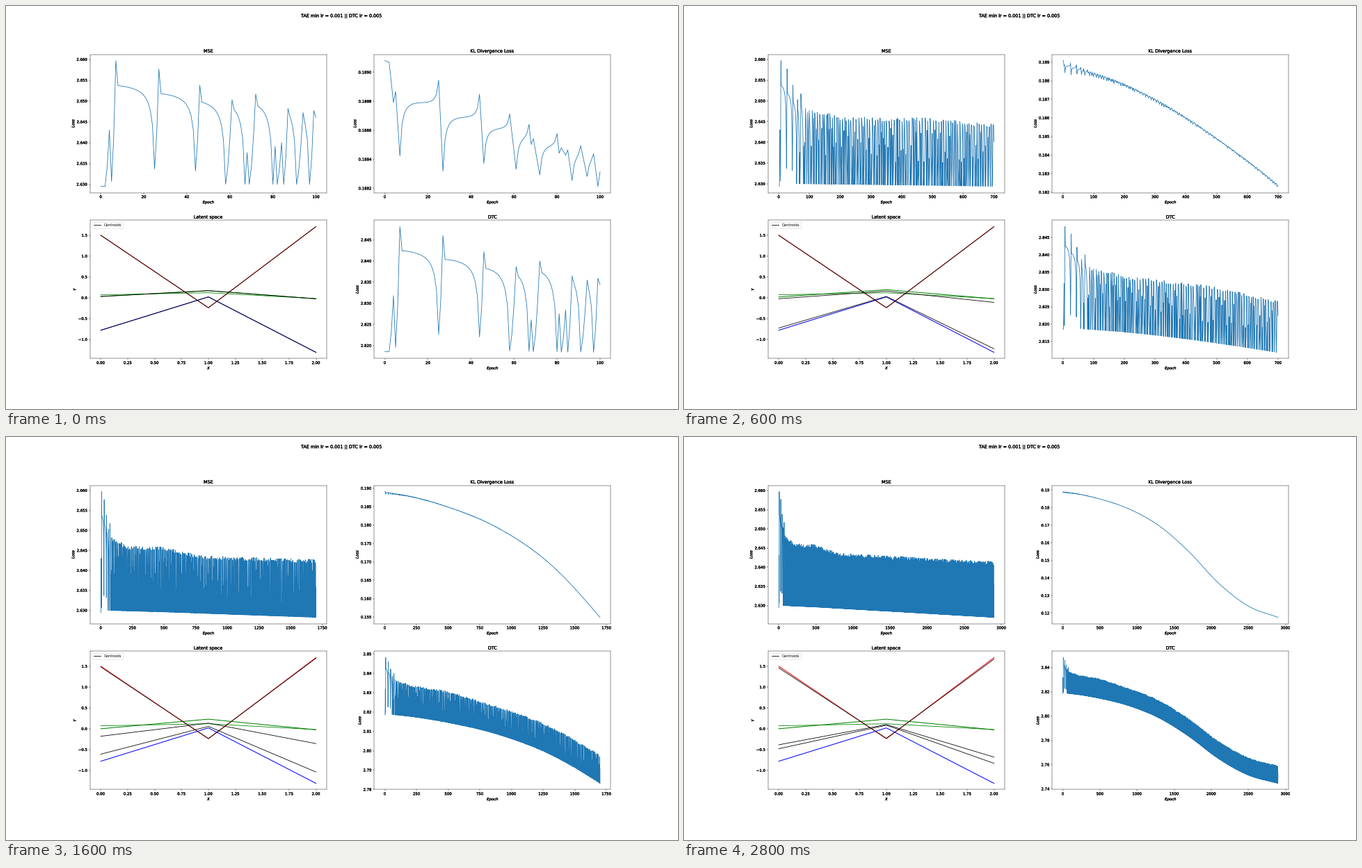
These frames come from a looping animation (966 by 580 pixels, 2.9 s). A matplotlib script:

```python
import numpy as np
import matplotlib.pyplot as plt
from matplotlib.animation import FuncAnimation
from matplotlib.patheffects import withStroke

W, H, DPI = 966, 580, 38.64
FRAMES, STEP = 29, 100
LAST = FRAMES * STEP
HEAVY = [withStroke(linewidth=0.55, foreground="black")]


def smooth(x, xs, ys):
    """Cubic Hermite curve through the points."""
    xs, ys = np.asarray(xs, float), np.asarray(ys, float)
    m = np.gradient(ys, xs)
    i = np.clip(np.searchsorted(xs, x) - 1, 0, len(xs) - 2)
    h = xs[i + 1] - xs[i]
    t = (x - xs[i]) / h
    return ((1 + 2 * t) * (1 - t) ** 2 * ys[i] + t * (1 - t) ** 2 * h * m[i]
            + t * t * (3 - 2 * t) * ys[i + 1] + t * t * (t - 1) * h * m[i + 1])


# Slow envelopes of the loss oscillation
def ceiling(e):
    return np.interp(e, [100, 200, 500, 800, LAST], [2.6482, 2.6462, 2.6459, 2.6437, 2.6415])


def floor(e):
    return np.interp(e, [5, 25, 44, 58, 500, LAST], [2.6307, 2.6337, 2.6332, 2.63, 2.6296, 2.6269])


def shoulder(e):
    return np.interp(e, [25, 58, LAST], [2.6549, 2.6515, 2.649])


def ripple(e):
    return np.interp(e, [27, 46, 100, 500, LAST], [45e-5, 30e-5, 20e-5, 11e-5, 7e-5])


def make_cycles(rng):
    """Each cycle is (peak epoch, trough epoch, peak loss)."""
    cycles = [(4, 5, 2.643), (7, 25, 2.6597), (27, 44, 2.6577), (46, 58, 2.6538),
              (61, 67, 2.6503), (68, 69, 2.6376), (72, 80, 2.6517), (81, 82, 2.6391),
              (84, 85, 2.640), (87, 91, 2.6482), (94, 97, 2.6472), (99, 103, 2.6477)]
    tall, trough = True, cycles[-1][1]
    while trough < LAST:
        peak = trough + rng.integers(1, 4)
        tall = not tall or rng.random() < 0.3
        trough = peak + (rng.integers(2, 5) if tall else 1)
        drop = rng.uniform(0, 0.001) if tall else rng.uniform(0.002, 0.011)
        cycles.append((peak, trough, ceiling(peak) - drop))
    return cycles


def oscillate(cycles):
    """Jump to each peak, then slide ever faster into the trough."""
    size = cycles[-1][1] + 1
    loss, wave = np.full(size, 2.6295), np.full(size, 18e-5)
    prev = 2
    for peak, trough, top in cycles:
        since = np.arange(trough - peak + 1)
        left = since[::-1]
        high, low = shoulder(trough), floor(trough)
        loss[peak:trough + 1] = np.minimum(top, high - (high - low) / (1 + left))
        climb = np.linspace(0, 1, peak - prev + 1)
        loss[prev:peak + 1] = loss[prev] + (top - loss[prev]) * climb ** 1.5

        depth = ripple(peak) * min(1, (trough - peak) / 4)
        wave[peak:trough + 1] = depth * (0.45 / (1 + left) - 1 / (1 + since))
        wave[prev:peak + 1] = wave[prev] + (wave[peak] - wave[prev]) * climb
        prev = trough
    return loss[:LAST + 1], wave[:LAST + 1]


epochs = np.arange(LAST + 1)
mse, wave = oscillate(make_cycles(np.random.default_rng(7)))
kl = wave + smooth(epochs, [0, 200, 500, 900, 1300, 1700, 2100, 2500, LAST],
                   [.1889, .1878, .1849, .1791, .1696, .1549, .1370, .1240, .1176])

# Left, middle and right value of each latent line
RED, BLUE, GREEN = [1.5, -0.24, 1.707], [-0.78, 0.02, -1.31], [0.07, 0.12, -0.02]
GREEN_START, GREEN_END = [0.03, 0.17, -0.025], [0, 0.23, -0.025]
# Centroids: first pose, last pose, exponent of the drift
CENTROIDS = [
    (RED, [1.46, -0.23, 1.67], 1.8),
    (GREEN_START, [-0.385, 0.10, -0.68], 1.5),
    (BLUE, [-0.48, 0.085, -0.83], 1.3),
]


def mix(a, b, t):
    return np.array(a) * (1 - t) + np.array(b) * t


def drift(s, power):
    return s ** power * (1.4 - 0.4 * s)


fig, axes = plt.subplots(2, 2, figsize=((W + 1e-6) / DPI, (H + 1e-6) / DPI), dpi=DPI)
fig.subplots_adjust(left=0.125, right=0.9, bottom=0.125, top=0.88,
                    wspace=0.2, hspace=0.2)
fig.suptitle("TAE min lr = 0.001 || DTC lr = 0.005", y=0.979, path_effects=HEAVY)
(ax_mse, ax_kl), (ax_latent, ax_dtc) = axes


def label(ax, title, x, y):
    ax.set_title(title, pad=5, path_effects=HEAVY)
    ax.set_xlabel(x, style="italic", labelpad=5, path_effects=HEAVY)
    ax.set_ylabel(y, style="italic", path_effects=HEAVY)


curves = []
for ax, title, values in [(ax_mse, "MSE", mse),
                          (ax_kl, "KL Divergence Loss", kl),
                          (ax_dtc, "DTC", mse + kl)]:
    label(ax, title, "Epoch", "Loss")
    curves.append((ax, ax.plot([], [])[0], values))

label(ax_latent, "Latent space", "X", "Y")
ax_latent.set(xlim=(-0.1, 2.1), ylim=(-1.461, 1.858))


def latent_line(values, color, width=1.5):
    return ax_latent.plot([0, 1, 2], values, color=color, lw=width)[0]


latent_line(RED, "r", 1.9)
latent_line(GREEN, "g")
green_line = latent_line(GREEN_START, "g", 1.9)
latent_line(BLUE, "b", 1.9)
center_lines = [latent_line(first, "k") for first, _, _ in CENTROIDS]
ax_latent.legend(center_lines[:1], ["Centroids"], loc="upper left")


def update(frame):
    count = STEP * (frame + 1) + 1
    for ax, line, values in curves:
        line.set_data(epochs[:count], values[:count])
        ax.relim()
        ax.autoscale_view()

    s = frame / (FRAMES - 1)
    green_line.set_ydata(mix(GREEN_START, GREEN_END, min(1, s / 0.55)))
    for line, (first, last, power) in zip(center_lines, CENTROIDS):
        line.set_ydata(mix(first, last, drift(s, power)))

    for ax in axes.flat:
        for text in ax.get_xticklabels() + ax.get_yticklabels():
            text.set_path_effects(HEAVY)


anim = FuncAnimation(fig, update, frames=FRAMES, interval=100,
                     repeat=True, repeat_delay=0)
plt.show()
```
